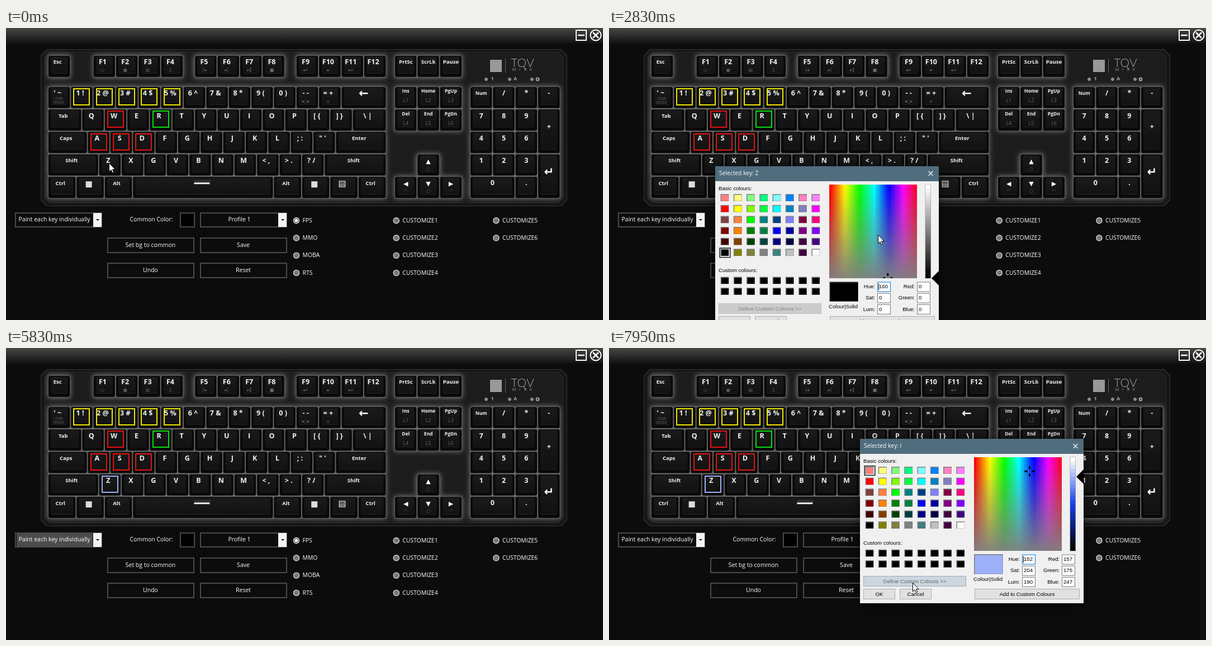
Write an HTML page with a canvas that moves like this. It is 1068 px wide and 524 px high and loops after 8000 ms.

```html
<!DOCTYPE html>
<html lang="en">
<head>
<meta charset="utf-8">
<title>Key colour picker</title>
<style>
html, body { margin: 0; width: 100%; height: 100%; overflow: hidden; background: #0c0c0c; }
canvas { display: block; }
</style>
</head>
<body>
<canvas id="stage" width="1068" height="524"></canvas>
<script>
const UI = '"Open Sans", sans-serif', CLASSIC = '"Liberation Sans", Arial, sans-serif', SYMBOL = '"DejaVu Sans", sans-serif';
const U = 40.35, LOOP = 8000;
const stage = document.getElementById('stage').getContext('2d');
const layer = (w, h) => Object.assign(document.createElement('canvas'), { width: w, height: h }).getContext('2d');
const base = layer(1068, 524), dlg = layer(400, 295);

function text(g, s, x, y, size, color = '#fff', align = 'center', font = UI, weight = 400) {
  g.font = `${weight} ${size}px ${font}`;
  g.textAlign = align;
  g.textBaseline = 'middle';
  g.fillStyle = color;
  g.fillText(s, x, y);
}
function fill(g, color, x, y, w, h) { g.fillStyle = color; g.fillRect(x, y, w, h); }
function box(g, color, x, y, w, h, line = 1) {
  g.strokeStyle = color;
  g.lineWidth = line;
  g.strokeRect(x + line / 2, y + line / 2, w - line, h - line);
}
function path(g, points, color) {
  g.beginPath();
  points.forEach(([x, y]) => g.lineTo(x, y));
  g.closePath();
  g.fillStyle = color;
  g.fill();
}
function lines(g, color, width, ...segments) {
  g.strokeStyle = color;
  g.lineWidth = width;
  g.beginPath();
  for (const [x1, y1, x2, y2] of segments) { g.moveTo(x1, y1); g.lineTo(x2, y2); }
  g.stroke();
}
function dot(g, x, y, r, color) {
  g.beginPath();
  g.arc(x, y, r, 0, 7);
  g.fillStyle = color;
  g.fill();
}
function fade(g, y1, y2, ...colors) {
  const grad = g.createLinearGradient(0, y1, 0, y2);
  colors.forEach((c, i) => grad.addColorStop(i / (colors.length - 1), c));
  return grad;
}

// ---- keyboard ----
const keys = [];
// Tokens are label§width; an empty label is a gap and "_" is a space.
function deck(x, y, tokens, pad = false) {
  for (const token of tokens.split(' ')) {
    const [label, w = 1, h = 1] = token.split('§');
    if (label) keys.push({ label: label.replace('_', ' '), x, y, w: w * U - 2, h: h * U - 2.5, pad });
    x += w * U;
  }
}
const rowY = r => 106 + r * 40.3, NAV = 696, PAD = 831;
deck(76, 50, 'Esc §1 F1 F2 F3 F4 §.5 F5 F6 F7 F8 §.5 F9 F10 F11 F12');
deck(76, rowY(0), "'_~ 1_! 2_@ 3_# 4_$ 5_% 6_^ 7_& 8_* 9_( 0_) -_- =_+ ←§2");
deck(76, rowY(1), 'Tab§1.5 Q W E R T Y U I O P [_{ ]_} \\_|§1.5');
deck(76, rowY(2), `Caps§1.75 A S D F G H J K L ;_: "_' Enter§2.25`);
deck(76, rowY(3), 'Shift§2.25 Z X G V B N M <_, >_. ?_/ Shift§2.75');
deck(76, rowY(4), 'Ctrl§1.25 ■§1.25 Alt§1.25 ▬§6.25 Alt§1.25 ■§1.25 ▤§1.25 Ctrl§1.25');
deck(NAV, 50, 'PrtSc ScrLk Pause', true);
deck(NAV, rowY(0), 'Ins Home PgUp', true);
deck(NAV, rowY(1), 'Del End PgDn', true);
deck(NAV, rowY(3), '§1 ▲', true);
deck(NAV, rowY(4), '◀ ▼ ▶', true);
deck(PAD, rowY(0), 'Num / * -', true);
deck(PAD, rowY(1), '7 8 9 +§1§2', true);
deck(PAD, rowY(2), '4 5 6', true);
deck(PAD, rowY(3), '1 2 3 ↵§1§2', true);
deck(PAD, rowY(4), '0§2 .', true);

const subs = { F1: '▭', F2: '◍', F3: '▤', F4: '♫', F5: '|◂', F6: '▸|', F7: '▸‖', F8: '■', F9: '◂+', F10: '◂-', F11: '◂+',
  '- -': '◂○▸', '= +': '⌂', Ins: 'L1', Home: 'L2', PgUp: 'L3', Del: 'L4', End: 'L5', PgDn: 'L6', '▲': '○', '▼': '○', '◀': '◠', '▶': '◠' };
const marks = { W: '#e81010', A: '#e81010', S: '#e81010', D: '#e81010', R: '#00e010' };
for (const s of ['1 !', '2 @', '3 #', '4 $', '5 %']) marks[s] = '#f0e800';

function mark(g, key, color) { box(g, color, Math.round(key.x) + 4, Math.round(key.y) + 2, 30, 31, 2); }

function drawKey(g, k) {
  const { label, x, y, w, h, pad } = k;
  g.fillStyle = '#090909';
  g.beginPath();
  g.roundRect(x, y, w, h, 3);
  g.fill();
  g.fillStyle = fade(g, y, y + h, '#1b1b1b', '#101010');
  g.beginPath();
  g.roundRect(x + 4, y + 1.5, w - 8, h - 8, 3);
  g.fill();
  lines(g, '#242424', 1, [x + 5, y + h - 6.5, x + w - 5, y + h - 6.5]);
  const cx = x + w / 2 - (pad ? 0 : 3), sub = subs[label];
  const nav = pad && /^L/.test(sub);
  const ly = label === '+' ? y + 31 : label === '↵' ? y + 32 : y + (nav ? 8 : 12);
  if (label === '■') fill(g, '#ddd', cx - 5, y + 8, 11, 11);
  else if (label === '▬') {
    fill(g, '#333', cx - 13, y + 6, 30, 3);
    fill(g, '#eee', cx - 13, y + 10, 28, 3);
  } else if (/[←↵▤▲▼◀▶]/.test(label)) {
    text(g, label, label === '←' ? cx + 3 : cx, ly + 1, /[←↵]/.test(label) ? 21 : label === '▤' ? 15 : 11, '#fff', 'center', SYMBOL, 700);
  } else {
    const small = /^[A-Z][a-z]/i.test(label);
    text(g, label, cx, ly, small ? (pad && label.length > 2 && y > 60 ? 8.5 : 9.5) : 12.5, '#f2f2f2', 'center', UI, 700);
  }
  if (sub) text(g, sub, cx, y + (nav ? 25 : 26), nav ? 9 : 8, label === 'F2' ? '#aaa' : '#686868', 'center', nav ? UI : SYMBOL);
  if (label === "' ~") ['USER', 'MODE'].forEach((s, i) => text(g, s, cx + 2, y + 21 + i * 7, 6.5, '#666'));
  if (marks[label]) mark(g, k, marks[label]);
}

function slab(g, l, t, r, b, cut, color) {
  path(g, [[l + cut, t], [r - cut, t], [r, t + cut], [r, b - cut], [r - cut, b], [l + cut, b], [l, b - cut], [l, t + cut]], color);
}

function drawBase(g) {
  fill(g, '#0c0c0c', 0, 0, 1068, 524);
  fill(g, fade(g, 0, 28, '#464646', '#111'), 0, 0, 1068, 28);
  box(g, '#fff', 1019, 3, 20, 20, 2);
  lines(g, '#fff', 2.5, [1023, 13, 1035, 13]);
  g.beginPath();
  g.arc(1055, 13, 9.5, 0, 7);
  g.lineWidth = 2;
  g.stroke();
  lines(g, '#fff', 2.5, [1050, 8, 1060, 18], [1060, 8, 1050, 18]);

  slab(g, 62, 38, 1004, 320, 11, '#2b2b2b');
  slab(g, 63.5, 39.5, 1002.5, 318.5, 11, '#141414');
  slab(g, 69, 43, 997, 314, 9, '#282828');
  slab(g, 70, 44, 996, 313, 9, '#1c1c1c');
  g.shadowColor = '#8c8c8c';
  g.shadowBlur = 9;
  for (const k of keys) fill(g, '#585858', k.x - 1, k.y - 1, k.w + 2, k.h + 2);
  g.shadowBlur = 0;
  keys.forEach(k => drawKey(g, k));

  fill(g, '#999', 866, 57, 21, 22);
  fill(g, '#666', 893, 55, 1, 25);
  text(g, 'TQV', 924, 64, 21, '#a2a2a2', 'center', '"Lato", sans-serif', 300);
  [...'MIRK'].forEach((c, i) => text(g, c, 909 + i * 10, 75, 7.5, '#999'));
  for (const x of [859, 901, 941]) dot(g, x, 92, 3, '#8a8a8a');
  text(g, '1', 870, 92, 9, '#aaa', 'center', UI, 700);
  text(g, 'A', 911, 92, 9, '#aaa', 'center', UI, 700);
  dot(g, 951, 92, 3.5, '#999');
  dot(g, 951, 92, 1.2, '#222');

  box(g, '#4a4a4a', 311, 331, 27, 27, 2);
  fill(g, '#000', 313, 333, 23, 23);
  text(g, 'Common Color:', 260, 344.5, 10.5);
  [[181, 376, 'Set bg to common'], [347, 376, 'Save'], [181, 421, 'Undo'], [347, 421, 'Reset']].forEach(([x, y, s]) => {
    box(g, '#4a4a4a', x, y, 156, 28, 2);
    text(g, s, x + 77.5, y + 14, 10.5);
  });
  drawCombo(g, 16, 'Paint each key individually');
  drawCombo(g, 347, 'Profile 1');
  const modes = ['FPS', 'MMO', 'MOBA', 'RTS'];
  for (let i = 1; i < 7; i++) modes.push('CUSTOMIZE' + i);
  modes.forEach((s, i) => {
    const x = 519.5 + 178.7 * (i >> 2), y = 345.5 + 31.3 * (i & 3);
    dot(g, x, y, 5.7, '#eee');
    dot(g, x, y, 4.6, '#777');
    if (!i) dot(g, x, y, 2.6, '#fff');
    text(g, s, x + 11, y + .5, 10.4, '#fff', 'left');
  });
}

function drawCombo(g, x, label, focus) {
  box(g, '#4a4a4a', x, 331, 156, 27, 2);
  if (focus) fill(g, '#4c4c4c', x + 3, 333, 136, 23);
  fill(g, '#f4f4f4', x + 140, 332, 15, 25);
  path(g, [[x + 145, 343], [x + 151, 343], [x + 148, 346]], '#111');
  text(g, label, x + 70.5, 344.5, 10.5);
}

// ---- colour dialog ----
const palette = ('f88 ff8 8f8 0f8 8ff 08f f8c f8f f00 ff0 8f0 0f4 0ff 08c 88c f0f 844 f84 0f0 088 048 88f 804 f08 ' +
  '800 f80 080 084 00f 00a 808 80f 400 840 040 044 008 004 404 408 000 880 884 888 488 ccc 404 fff')
  .split(' ').map(s => '#' + s.replace(/./g, c => c === 'f' ? 'ff' : c + '0'));
const hsl = (h, s, l) => `hsl(${h * 1.5} ${s / 2.4}% ${l / 2.4}%)`;
function rgb(h, s, l) {
  h /= 20; s /= 240; l /= 240;
  return [0, 8, 4].map(n => {
    const k = (n + h) % 12;
    return Math.round(255 * (l - s * Math.min(l, 1 - l) * Math.max(-1, Math.min(k - 3, 9 - k, 1))));
  });
}

const spectrum = layer(157, 168);
for (let i = 0; i < 40; i++) for (let j = 0; j < 28; j++)
  fill(spectrum, hsl(i * 6, 240 - j * 8.4, 120), i * 3.925, j * 6, 5, 6);

function button(g, label, x, y, w, state) {
  const [bg, edge, ink] = { normal: ['#e1e1e1', '#adadad', '#000'], focus: ['#e1e1e1', '#0078d7', '#000'],
    hover: ['#e5f1fb', '#0078d7', '#000'], pressed: ['#cce4f7', '#005499', '#000'], disabled: ['#ccc', '#bfbfbf', '#838383'] }[state];
  fill(g, bg, x, y, w, 19);
  box(g, edge, x, y, w, 19, state === 'focus' ? 2 : 1);
  text(g, label, x + w / 2, y + 10, 9.6, ink, 'center', CLASSIC);
}
function sunken(g, color, x, y, w, h) {
  fill(g, '#fff', x, y, w, h);
  fill(g, '#808080', x, y, w - 1, h - 1);
  fill(g, color, x + 1.5, y + 1.5, w - 3, h - 3);
}

function drawDialog(g, d) {
  const w = d.wide ? 400 : 199.5, label = (s, x, y, align = 'left') => text(g, s, x, y, 9.6, '#000', align, CLASSIC);
  const inside = (x, y, bw) => d.mx >= x && d.mx <= x + bw && d.my >= y && d.my <= y + 19;
  g.clearRect(0, 0, 400, 295);
  fill(g, '#f0f0f0', 0, 0, w, 295);
  fill(g, '#4f6d7d', 0, 0, w, 27);
  text(g, 'Selected key: ' + d.key, 7, 13.5, 10.3, '#fff', 'left');
  const cx = w - 14.5;
  lines(g, '#fff', 1.1, [cx - 4, 9, cx + 4, 17], [cx + 4, 9, cx - 4, 17]);
  label('Basic colours:', 6, 40);
  label('Custom colours:', 6, 187);
  const swatch = (i, y, color) => sunken(g, color, 9.5 + 23.25 * (i % 8), y, 16, 14);
  palette.forEach((c, i) => swatch(i, 50 + 19.65 * (i >> 3), c));
  for (let i = 0; i < 16; i++) swatch(i, 198.5 + 19.5 * (i >> 3), '#000');
  const sy = 48 + 19.65 * (d.pick >> 3);
  box(g, '#000', 7.5, sy, 20, 18, 1.3);

  if (d.wide) {
    button(g, 'Define Custom Colours >>', 6, 246, 184, 'pressed');
    g.globalAlpha = Math.min(1, d.wideAge / 550);
    button(g, 'Define Custom Colours >>', 6, 246, 184, 'disabled');
    g.globalAlpha = 1;
  } else button(g, 'Define Custom Colours >>', 6, 246, 184, inside(6, 246, 184) ? 'hover' : 'normal');
  button(g, 'OK', 6, 269, 57, inside(6, 269, 57) ? 'hover' : d.wide ? 'normal' : 'focus');
  button(g, 'Cancel', 71, 269, 57, inside(71, 269, 57) ? 'hover' : 'normal');
  if (!d.wide) return;

  const { hue, sat, lum } = d;
  g.drawImage(spectrum.canvas, 204, 33);
  g.save();
  g.beginPath();
  g.rect(204, 33, 157, 168);
  g.clip();
  const x = 204 + hue / 240 * 157, y = 201 - sat / 240 * 168;
  lines(g, '#000', 3, [x - 9, y, x - 4, y], [x + 4, y, x + 9, y], [x, y - 9, x, y - 4], [x, y + 4, x, y + 9]);
  g.restore();
  for (let i = 0; i < 24; i++) fill(g, hsl(hue, sat, 240 - i * 240 / 23), 376, 33 + i * 7, 10, 7);
  box(g, '#999', 375.5, 32.5, 10.5, 169, .6);
  const ay = 201 - lum / 240 * 168;
  path(g, [[387, ay], [400, ay - 13], [400, ay + 13]], '#000');
  sunken(g, hsl(hue, sat, lum), 204, 207, 53, 37);
  label('Colour|Solid', 203, 252);
  const values = [hue, sat, lum].map(Math.round).concat(rgb(hue, sat, lum));
  ['Hue:', 'Sat:', 'Lum:', 'Red:', 'Green:', 'Blue:'].forEach((s, i) => {
    const fx = i < 3 ? 290 : 361, fy = 207.5 + 20.2 * (i % 3), active = !i && !d.okFocus;
    label(s, fx - 4, fy + 9, 'right');
    fill(g, '#fff', fx, fy, 24, 18);
    box(g, active ? '#0078d7' : '#7a7a7a', fx, fy, 24, 18);
    label(values[i], fx + 3, fy + 9);
    if (active) fill(g, '#000', fx + 2, fy + 3, 1, 12);
  });
  button(g, 'Add to Custom Colours', 205, 269, 188, d.addFocus ? 'focus' : 'normal');
}

// ---- timeline ----
const track = [[0, 184, 242], [560, 184, 243], [640, 183, 246], [860, 183, 246], [1380, 235, 290], [1660, 258, 442], [2100, 290, 503],
  [2250, 290, 503], [2830, 481, 371], [3050, 486, 342], [3250, 494, 309], [3400, 494, 309], [3650, 579, 410], [3860, 580, 331], [4000, 580, 317],
  [4080, 580, 317], [4150, 579, 308], [4880, 292, 515], [5250, 228, 526], [5900, 235, 530], [6560, 441, 163],
  [6710, 441, 163], [7580, 543, 421], [8000, 543, 421]];
function cursorAt(t) {
  const i = track.findIndex(p => p[0] > t);
  const [t1, x1, y1] = track[i - 1], [t2, x2, y2] = track[i], k = (t - t1) / (t2 - t1);
  return [x1 + (x2 - x1) * k, y1 + (y2 - y1) * k];
}
const clamp = v => Math.max(0, Math.min(1, v));

const dialogs = [
  { key: 'Z', x: 190, y: 248, pick: 40, open: 860, expand: 2250, close: 5470 },
  { key: 'I', x: 449, y: 163, pick: 0, open: 6650, expand: 7650, close: 1e9 }
];
function colourAt(t, my) {
  if (t > 6000) return { hue: 152, sat: 204, lum: 190 };
  if (t < 3250) return { hue: 160, sat: 0, lum: 0 };
  const lum = t < 3650 ? 0 : t < 4000 ? (449 - my) / 168 * 240 : 190;
  return { hue: 152, sat: 202, lum: Math.min(lum, 240) };
}

function showDialog(g, d, t, mx, my) {
  const k = t < d.close ? clamp((t - d.open) / 110) : 1 - clamp((t - d.close) / 150);
  if (k <= 0) return;
  const wide = t >= d.expand, w = wide ? 400 : 199.5, h = 295, s = .95 + .05 * k;
  drawDialog(dlg, { ...d, ...colourAt(t, my), wide, wideAge: t - d.expand, mx: mx - d.x, my: my - d.y,
    addFocus: t > 3650 && t < 4960, okFocus: t > 5000 && t < 6000 });
  g.save();
  g.globalAlpha = k;
  g.shadowColor = 'rgba(0,0,0,.55)';
  g.shadowBlur = 18;
  g.shadowOffsetY = 3;
  g.drawImage(dlg.canvas, 0, 0, w, h, d.x + w * (1 - s) / 2, d.y + h * (1 - s) / 2, w * s, h * s);
  g.restore();
}

function drawCursor(g, x, y) {
  g.save();
  g.translate(x, y);
  path(g, [[.5, .5], [.5, 16], [4, 12.6], [6.4, 18], [8.8, 17], [6.5, 11.8], [11.3, 11.8]], '#fff');
  g.strokeStyle = '#000';
  g.lineWidth = 1;
  g.stroke();
  g.restore();
}

const keyZ = keys.find(k => k.label === 'Z');
function frame(now) {
  const t = now % LOOP, [mx, my] = cursorAt(t);
  stage.drawImage(base.canvas, 0, 0);
  if (t >= 5500) mark(stage, keyZ, '#9daff7');
  if (t >= 5500 && t < 6620) drawCombo(stage, 16, 'Paint each key individually', true);
  dialogs.forEach(d => showDialog(stage, d, t, mx, my));
  drawCursor(stage, mx, my);
  requestAnimationFrame(frame);
}
drawBase(base);
requestAnimationFrame(frame);
</script>
</body>
</html>
```
